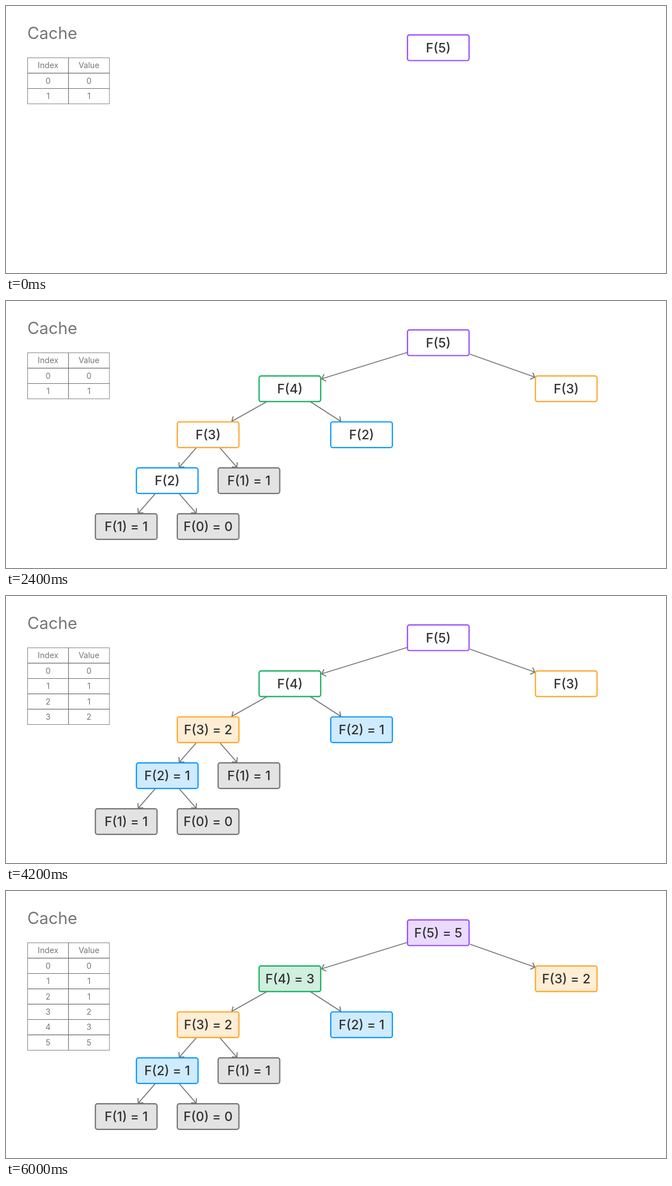
An HTML page that plays this animation: 1175 px wide and 477 px high, repeating every 6.6 s.

```html
<!DOCTYPE html>
<html lang="en">
<head>
<meta charset="utf-8">
<title>Fibonacci with a cache</title>
<style>
html, body { margin: 0; width: 100%; height: 100%; overflow: hidden; background: #fff; }
svg { display: block; width: 100%; height: 100%; }
text { font-family: Inter, "Liberation Sans", Arial, sans-serif; }
.title { font-size: 29.25px; fill: #757575; }
.cell { font-size: 14.2px; fill: #757575; text-anchor: middle; }
.call { font-size: 22.9px; font-weight: 500; fill: #333; text-anchor: middle; }
.arrow { fill: none; stroke: #757575; stroke-width: 1.8; }
.grid { fill: none; stroke: #757575; stroke-width: 0.9; }
</style>
</head>
<body>
<svg id="stage" viewBox="0 0 1175 477"></svg>
<script>
const STEP = 600, STEPS = 11;
const BOX = { w: 109.7, h: 45.8 };
const TABLE = { x: 38.5, y: 92.6, col: 72.8, row: 27.4 };
const FIB = [0, 1, 1, 2, 3, 5];
const STROKE = ['#757575', '#757575', '#0d99ff', '#ffa629', '#14ae5c', '#9747ff'];
const TINT = ['#e3e3e3', '#e3e3e3', '#cfebff', '#ffedd4', '#d0efde', '#eadaff'];

// n: argument, x/y: centre, show: first step, solve: step at which the value appears
const calls = [
  { n: 5, x: 769.6, y: 74.6, show: 0, solve: 10 },
  { n: 4, x: 505.4, y: 156.8, show: 1, solve: 8 },
  { n: 3, x: 997.4, y: 156.8, show: 1, solve: 9 },
  { n: 3, x: 359.8, y: 238.9, show: 2, solve: 6 },
  { n: 2, x: 633, y: 238.9, show: 2, solve: 7 },
  { n: 2, x: 287, y: 321, show: 3, solve: 5 },
  { n: 1, x: 432.5, y: 321, show: 3, solve: 3 },
  { n: 1, x: 214, y: 403, show: 4, solve: 4 },
  { n: 0, x: 359.8, y: 403, show: 4, solve: 4 }
];

// step, start x/y, tip x/y
const arrows = [
  [1, 714, 92, 562, 139],
  [1, 826, 95, 941.5, 136],
  [2, 464, 180, 402, 215],
  [2, 542, 180, 596, 215],
  [3, 338.5, 262.5, 308.5, 297],
  [3, 381, 262.5, 411, 297],
  [4, 265.5, 344.5, 235.5, 379],
  [4, 308.5, 344.5, 338.5, 379]
];

const stage = document.getElementById('stage');

function add(tag, attrs, text) {
  const el = document.createElementNS('http://www.w3.org/2000/svg', tag);
  for (const key in attrs) el.setAttribute(key, attrs[key]);
  if (text !== undefined) el.textContent = text;
  return stage.appendChild(el);
}

function show(els, on) {
  for (const el of els) el.style.display = on ? '' : 'none';
}

function arrowPath(x1, y1, x2, y2) {
  const back = Math.atan2(y1 - y2, x1 - x2);
  const barb = turn => {
    const a = back + turn * Math.PI / 4;
    return `${x2 + 9 * Math.cos(a)} ${y2 + 9 * Math.sin(a)}`;
  };
  return `M${x1} ${y1}L${x2} ${y2}M${barb(-1)}L${x2} ${y2}L${barb(1)}`;
}

function addRow(i, left, right) {
  const { x, y, col, row } = TABLE;
  const top = y + i * row;
  const cells = [x, x + col].map(cx =>
    add('rect', { class: 'grid', x: cx, y: top, width: col, height: row }));
  const labels = [left, right].map((label, k) =>
    add('text', { class: 'cell', x: x + (k + 0.5) * col, y: top + row / 2 + 5.1 }, label));
  return { cells, all: [...cells, ...labels] };
}

add('text', { class: 'title', x: 38, y: 59.4 }, 'Cache');
addRow(0, 'Index', 'Value');
const rows = FIB.map((value, n) => addRow(n + 1, n, value));

const lines = arrows.map(([step, ...ends]) =>
  ({ step, el: add('path', { class: 'arrow', d: arrowPath(...ends) }) }));

for (const c of calls) {
  c.box = add('rect', {
    x: c.x - BOX.w / 2, y: c.y - BOX.h / 2, width: BOX.w, height: BOX.h,
    rx: 3.6, stroke: STROKE[c.n], 'stroke-width': 2.2
  });
  c.label = add('text', { class: 'call', x: c.x, y: c.y + 8.3 });
}

function draw(step) {
  for (const c of calls) {
    const solved = step >= c.solve;
    show([c.box, c.label], step >= c.show);
    c.box.setAttribute('fill', solved ? TINT[c.n] : '#fff');
    c.label.textContent = `F(${c.n})` + (solved ? ` = ${FIB[c.n]}` : '');
  }
  for (const line of lines) show([line.el], step >= line.step);

  // The row just written or looked up is tinted.
  const active = calls.find(c => c.n > 1 && c.solve === step);
  rows.forEach((row, n) => {
    const known = n < 2 || calls.some(c => c.n === n && step >= c.solve);
    show(row.all, known);
    const fill = active && active.n === n ? TINT[n] : '#fff';
    for (const cell of row.cells) cell.setAttribute('fill', fill);
  });
}

const start = performance.now();
let shown = -1;

function tick() {
  const step = Math.floor((performance.now() - start) / STEP) % STEPS;
  if (step !== shown) draw(shown = step);
  requestAnimationFrame(tick);
}
tick();
</script>
</body>
</html>
```
